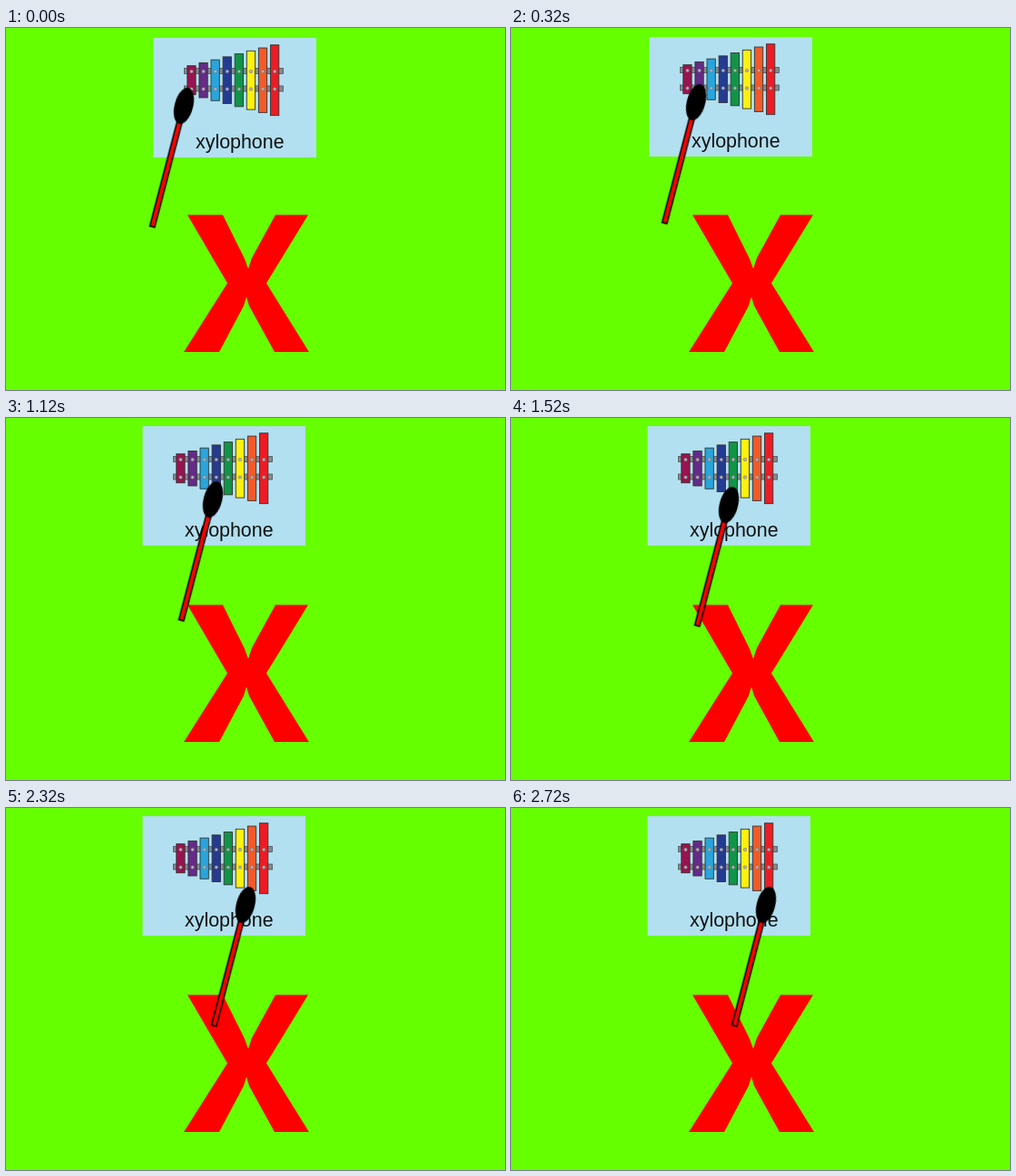
An HTML page that plays this animation: 550x400 px, repeating every 2.8 s.

```html
<!DOCTYPE html>
<html lang="en">
<head>
<meta charset="utf-8">
<title>X is for xylophone</title>
<style>
  html, body { margin: 0; width: 100%; height: 100%; overflow: hidden; background: #66ff00; }
  svg { display: block; width: 550px; height: 400px; }
  text { font: 21.4px "Liberation Sans", Arial, sans-serif; fill: #111; }
  .rail { fill: #858b90; stroke: #4c5258; stroke-width: .8; }
  .bar { stroke: #333; stroke-width: .9; }
  .peg { fill: #b4b4bc; stroke: #777; stroke-width: .6; }
  #card { animation: card 2800ms step-end infinite; }
  #mallet { animation: mallet 2800ms step-end infinite; }

  @keyframes card {
    0% { transform: translate(12px, 2px); }
    11.4286% { transform: translate(2px, 1px); }
    40%, 100% { transform: translate(0, 0); }
  }
  @keyframes mallet {
    0% { transform: translate(196px, 86px); }
    11.4286% { transform: translate(204px, 82px); }
    25.7143% { transform: translate(215px, 84px); }
    40% { transform: translate(228px, 90px); }
    54.2857% { transform: translate(240px, 96px); }
    68.5714% { transform: translate(252px, 101px); }
    82.8571% { transform: translate(264px, 107px); }
    97.1429%, 100% { transform: translate(281px, 107px); }
  }
</style>
</head>
<body>
<svg viewBox="0 0 550 400">
  <path role="img" aria-label="X" fill="#f00"
    d="M200 206.6H239L263 255L267 266L271 254L297 206.6H333L287 282L334 358H296L268 307L265 297L262 307L235 358H196L244 282Z"/>
  <g id="card">
    <rect x="150.6" y="9" width="179.4" height="132" fill="#b2e0f0"/>
    <rect class="rail" x="184.5" y="42.5" width="109" height="6"/>
    <rect class="rail" x="184.5" y="62" width="109" height="6"/>
    <g id="bars"></g>
    <text x="197" y="130.5">xylophone</text>
  </g>
  <g id="mallet">
    <g transform="rotate(14.6)">
      <rect x="-2.7" y="10" width="5.4" height="128" fill="#f00" stroke="#000" stroke-width="1.6"/>
      <ellipse rx="10.2" ry="20.5"/>
    </g>
  </g>
</svg>
<script>
  const bars = document.getElementById("bars");
  const colors = ["#991350", "#652b86", "#29a5dc", "#253b91", "#129447", "#fff010", "#f15a29", "#ed1c24"];

  function add(tag, attrs) {
    const node = document.createElementNS(bars.namespaceURI, tag);
    for (const key in attrs) node.setAttribute(key, attrs[key]);
    bars.append(node);
  }

  // Each bar is taller than the one before, all centred on the same line.
  colors.forEach((fill, i) => {
    const x = 187.8 + i * 13.1;
    const half = 16 + i * 3.28;
    add("rect", { class: "bar", x, y: 55.7 - half, width: 9.3, height: half * 2, fill });
    for (const cy of [46, 65.5]) add("circle", { class: "peg", cx: x + 4.7, cy, r: 1.7 });
  });
</script>
</body>
</html>
```
